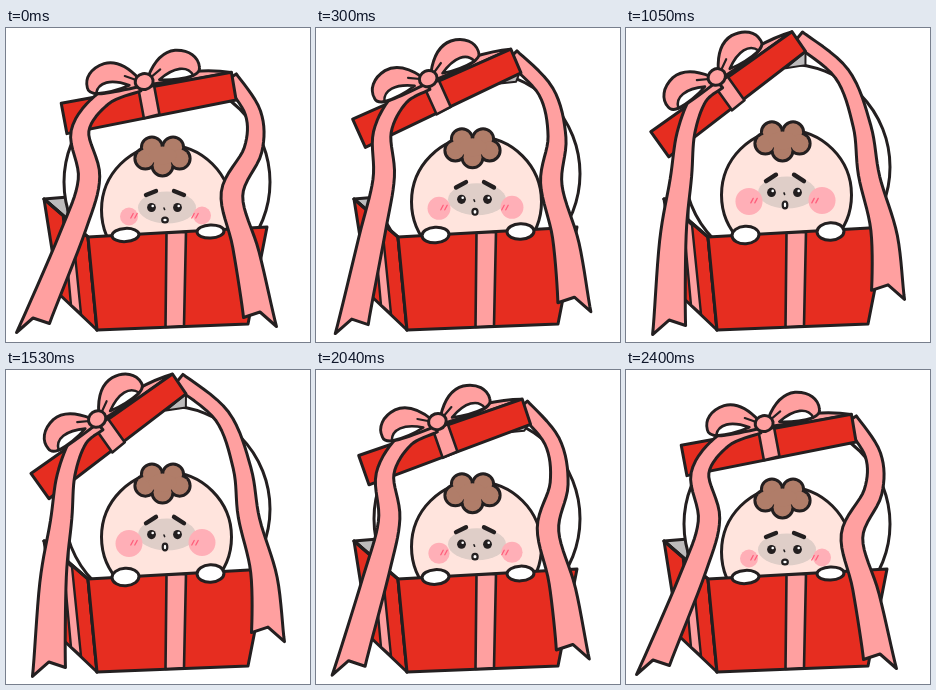
An HTML page with a canvas for the animation above (2.7 s loop, 304 px wide and 314 px high).

```html
<!DOCTYPE html>
<html lang="en">
<head>
<meta charset="utf-8">
<title>Gift box</title>
<style>
html, body { margin: 0; width: 100%; height: 100%; overflow: hidden; background: #fff; }
canvas { display: block; width: 304px; height: 314px; }
</style>
</head>
<body>
<canvas id="stage"></canvas>
<script>
const W = 304, H = 314, LOOP = 2700, STEP = 30;
const INK = '#231f20', RED = '#e62d20', PINK = '#ffa0a0', GREY = '#bdbbbc',
      SKIN = '#ffe4dd', MASK = '#dfcec8', HAIR = '#b07d69';

const canvas = document.getElementById('stage');
const ctx = canvas.getContext('2d');
const ratio = window.devicePixelRatio || 1;
canvas.width = W * ratio;
canvas.height = H * ratio;

// Ribbon centre lines with the lid closed and open.
const LEFT = {
  side: -1,
  closed: [[132, 56], [98, 70], [74, 103], [83, 150], [67, 203], [27, 300]],
  open: [[92, 54], [73, 70], [60, 105], [55, 150], [47, 210], [43, 302]]
};
const RIGHT = {
  side: 1,
  closed: [[224, 50], [247, 85], [247, 122], [226, 166], [240, 222], [254, 294]],
  open: [[172, 10], [216, 46], [236, 98], [243, 148], [258, 205], [262, 267]]
};

const mix = (a, b, p) => a + (b - a) * p;

function smooth(t, from, to) {
  const u = Math.max(0, Math.min(1, (t - from) / (to - from)));
  return u * u * (3 - 2 * u);
}

// How far the lid is open: rise, slight overshoot, rest, fall.
function openness(t) {
  const swing = t > 540 && t < 1080 ? 0.03 * Math.sin(Math.PI * (t - 540) / 540) : 0;
  return smooth(t, 0, 565) - smooth(t, 1500, 2400) + swing;
}

function paint(fill, width = 3, stroke = INK) {
  if (fill) { ctx.fillStyle = fill; ctx.fill(); }
  if (width) { ctx.lineWidth = width; ctx.strokeStyle = stroke; ctx.stroke(); }
}

function polygon(points, fill, width) {
  ctx.beginPath();
  points.forEach(([x, y]) => ctx.lineTo(x, y));
  ctx.closePath();
  paint(fill, width);
}

function oval(x, y, rx, ry, fill, width = 0, turn = 0) {
  ctx.beginPath();
  ctx.ellipse(x, y, rx, ry, turn, 0, Math.PI * 2);
  paint(fill, width);
}

function line(points, width = 3, color = INK) {
  ctx.beginPath();
  points.forEach(([x, y]) => ctx.lineTo(x, y));
  paint(null, width, color);
}

// Catmull-Rom position and direction at u in 0..1.
function along(points, u) {
  const last = points.length - 1;
  const i = Math.min(last - 1, Math.floor(u * last)), f = u * last - i;
  const at = k => points[Math.max(0, Math.min(last, k))];
  const [a, b, c, d] = [at(i - 1), at(i), at(i + 1), at(i + 2)];
  const axis = k => {
    const m = (c[k] - a[k]) / 2, n = (d[k] - b[k]) / 2, e = c[k] - b[k];
    const q = 3 * e - 2 * m - n, r = m + n - 2 * e;
    return [b[k] + f * (m + f * (q + f * r)), m + f * (2 * q + 3 * f * r)];
  };
  const [x, dx] = axis(0), [y, dy] = axis(1), len = Math.hypot(dx, dy);
  return { x, y, dx: dx / len, dy: dy / len };
}

// A band that widens towards a slanted, notched tail.
function ribbon({ side, closed, open }, p) {
  const spine = closed.map((c, i) => c.map((v, k) => mix(v, open[i][k], p)));
  const near = [], far = [], samples = 40;
  for (let i = 0; i <= samples; i++) {
    const u = i / samples, flare = u * u, half = 7.5 * (1 - flare);
    const { x, y, dx, dy } = along(spine, u);
    const ox = dy * half + 16.5 * flare, oy = -dx * half + side * 4.5 * flare;
    near.push([x - ox, y - oy]);
    far.push([x + ox, y + oy]);
  }
  const [x, y] = spine[spine.length - 1];
  polygon([...near, [x, y - 10], ...far.reverse()], PINK);
}

function hair() {
  const lobes = Array.from({ length: 5 }, (_, i) => {
    const a = Math.PI * (0.5 + 0.4 * i);
    return [156.5 + 18 * Math.cos(a), 127.5 + 10 * Math.sin(a)];
  });
  lobes.forEach(([x, y]) => oval(x, y, 10.5, 10.5, INK, 3));
  lobes.forEach(([x, y]) => oval(x, y, 9, 9, HAIR));
  oval(156.5, 127.5, 14, 9, HAIR);
}

function face(p) {
  oval(160.5, 182, 65, 65, SKIN, 3);
  oval(161, 179.5, 29, 16, MASK);

  const cheek = mix(9, 13.5, p), tilt = mix(2, 3.2, p);
  const mouthWidth = mix(2.8, 2.3, p), mouthHeight = mix(2.4, 3.4, p);
  for (const side of [-1, 1]) {
    const cheekX = 159.5 + 36.5 * side, markX = 158.5 + 30.5 * side;
    oval(cheekX, 188 - 0.5 * side, cheek, cheek, '#ffafb7');
    for (const dx of [-2, 2])
      line([[markX + dx - 1.2, 190], [markX + dx + 1.2, 185.5]], 1.3, '#ff5f7c');

    const eyeX = 158.5 + 13 * side, browX = 159 + 14 * side;
    oval(eyeX, 179.5, 4.4, 4.6, INK);
    oval(eyeX + 1.2, 178, 1.3, 1.3, '#fff');
    line([[browX - 5 * side, 165 - tilt], [browX + 5 * side, 165 + tilt]], 4.4);
  }
  line([[158, 180], [158.6, 181.5]], 1.6);
  oval(159, 192, mouthWidth, mouthHeight, '#fff', 2.2);
}

function character(p) {
  ctx.save();
  ctx.translate(0, -15 * p);
  oval(161, 154, 103, 103, '#fff', 3);
  face(p);
  hair();
  ctx.restore();
}

function box() {
  polygon([[38, 171], [53, 266], [91, 302], [82, 209]], RED);
  polygon([[57, 189], [66, 197], [75, 286], [65, 277]], PINK, 2.4);
  line([[38, 171], [82, 209], [91, 302]]);
  polygon([[82, 209], [261, 199], [242, 296], [91, 302]], RED);
  polygon([[160.5, 205], [180, 204], [178, 298], [159.5, 299]], PINK, 2.6);
}

function hands(p) {
  const ry = mix(6.6, 8.8, p);
  oval(119.5, 207, 13.5, ry, '#fff', 3, -0.06);
  oval(204.5, 203.5, 13.5, ry, '#fff', 3, -0.04);
}

function onLid(p, draw) {
  ctx.save();
  ctx.translate(143 - 39 * p, 74 - 8.5 * p);
  ctx.rotate(-(10.6 + 24.9 * p) * Math.PI / 180);
  draw(p);
  ctx.restore();
}

function lid(p) {
  ctx.beginPath();
  ctx.moveTo(0, -24);
  ctx.quadraticCurveTo(55, -25, 86, -14);
  ctx.lineTo(0, -14);
  paint(PINK);
  polygon([[60, 12], [86, 10], [78, 14 + 7 * p]], GREY, 2);
  polygon([[-86.5, -15], [86.5, -14], [86, 14 - 4 * p], [-86.5, 16]], RED);
  polygon([[-8, -15], [8, -15], [8, 14], [-8, 15]], PINK, 2.6);
}

function loop(side) {
  ctx.save();
  ctx.translate(-1, 0);
  ctx.scale(side * 0.95, 1);
  ctx.beginPath();
  ctx.moveTo(5, -25);
  ctx.bezierCurveTo(15, -40, 25, -47, 38, -46);
  ctx.bezierCurveTo(53, -44, 61, -35, 60, -25);
  ctx.bezierCurveTo(60, -15, 40, -16, 5, -17);
  ctx.closePath();
  paint(PINK);
  ctx.beginPath();
  ctx.moveTo(52, -18);
  ctx.bezierCurveTo(48, -29, 34, -30, 16, -20);
  ctx.quadraticCurveTo(34, -16, 52, -18);
  paint('#fff', 2.6);
  line([[8, -24], [19, -30]], 2.2);
  ctx.restore();
}

function bow() {
  loop(-1);
  loop(1);
  oval(-1, -21, 9, 8, PINK, 3);
}

function draw(t) {
  const p = openness(t);
  ctx.setTransform(ratio, 0, 0, ratio, 0, 0);
  ctx.fillStyle = '#fff';
  ctx.fillRect(0, 0, W, H);
  ctx.lineJoin = ctx.lineCap = 'round';
  polygon([[38, 171], [62, 169], [62, 192]], GREY);
  character(p);
  box();
  hands(p);
  ribbon(RIGHT, p);
  onLid(p, lid);
  ribbon(LEFT, p);
  onLid(p, bow);
}

const start = performance.now();
function tick() {
  const t = (performance.now() - start) % LOOP;
  draw(Math.floor(t / STEP) * STEP);
  requestAnimationFrame(tick);
}
tick();
</script>
</body>
</html>
```
